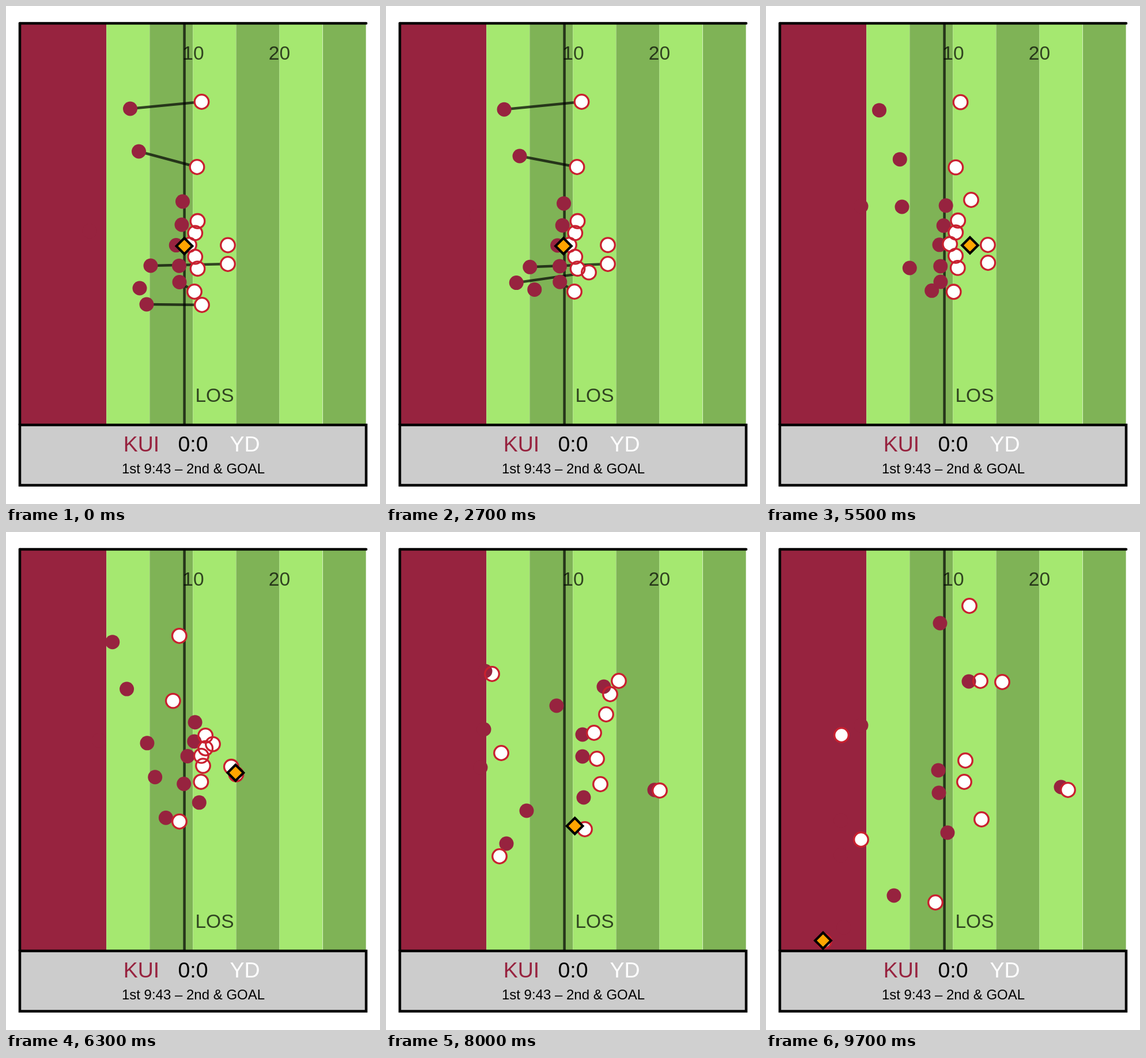
An HTML page with a canvas that plays this animation: 649x863 px, repeating every 9800 ms.

```html
<!DOCTYPE html>
<html lang="en">
<head>
<meta charset="utf-8">
<title>Play animation</title>
<style>
  html, body { margin: 0; width: 100%; height: 100%; overflow: hidden; background: #fff; }
  canvas { display: block; width: 649px; height: 863px; }
</style>
</head>
<body>
<canvas id="stage" width="649" height="863"></canvas>
<script>
const ctx = document.getElementById('stage').getContext('2d');
const LOOP = 9800, STEP = 100;
const SNAP = 5.1, SNAP_CAUGHT = 5.77, THROW = 7.6, CATCH = 8.53;
const MAROON = '#97233f', RED = '#c9202f', INK = 'rgba(0,0,0,0.7)';
const LIGHT = '#a5e870', DARK = '#7fb356';

const mix = (a, b, k) => a + (b - a) * k;
const mixPoint = (p, q, k) => [mix(p[0], q[0], k), mix(p[1], q[1], k)];
const add = (p, q) => [p[0] + q[0], p[1] + q[1]];

// Monotone cubic interpolation: eases in from rest, never overshoots.
function curve(ts, vs) {
  const slopes = ts.slice(1).map((t, i) => (vs[i + 1] - vs[i]) / (t - ts[i]));
  const tangents = ts.map((_, i) => {
    const a = slopes[i - 1] ?? slopes[i], b = slopes[i] ?? a;
    return a * b > 0 ? 2 * a * b / (a + b) : 0;
  });
  return t => {
    let i = 0;
    while (i < ts.length - 2 && t > ts[i + 1]) i++;
    const h = ts[i + 1] - ts[i];
    const u = Math.min(1, (t - ts[i]) / h), w = 1 - u;
    return vs[i] * (1 + 2 * u) * w * w + tangents[i] * h * u * w * w
      + vs[i + 1] * u * u * (3 - 2 * u) - tangents[i + 1] * h * u * u * w;
  };
}

// Smooth path through [time, x, y] points.
function track(...points) {
  const [ts, xs, ys] = [0, 1, 2].map(k => points.map(p => p[k]));
  const x = curve(ts, xs), y = curve(ts, ys);
  return t => [x(t), y(t)];
}

const timed = (times, points) => track(...points.map((p, i) => [times[i], ...p]));

// Waits on a spot until the snap, then runs through three points.
const run = (spot, ...points) => timed([0, 5.3, 7.1, 8, 9.7], [spot, spot, ...points]);

// A defender keeps a changing offset from his man.
const follow = (man, offset) => t => add(man(t), offset(t));
const mark = (man, ...offsets) => follow(man, timed([0, 5.5, 8, 9.7], offsets));

// Offensive line: evenly spaced, bowed back from the center.
const lineSpot = i => [318 + 14.5 * Math.sqrt(Math.abs(i) / 2), 414 + 20.6 * i];

const tackleA = run(lineSpot(-2), [365, 324], [389, 281], [372, 258]);
const guardA = run(lineSpot(-1), [367, 349], [382, 316], [410, 260]);
const center = run(lineSpot(0), [357, 361], [361, 348], [346, 396]);
const guardB = run(lineSpot(1), [357, 384], [366, 393], [344, 433]);
const tackleB = run(lineSpot(2), [348, 417], [372, 437], [374, 498]);

const wideA = run([339.5, 166], [248, 202], [184, 246], [131, 352]);
const wideB = run([331.5, 279], [240, 316], [200, 383], [165, 533]);
const tight = run([327, 495], [262, 514], [197, 562], [101, 709]);
const runner = run([385, 447], [398, 348], [404, 258], [353, 128]);
const passer = track([0, 385, 414.5], [5.5, 385, 414], [7.1, 428, 431],
  [8, 475, 448], [9, 525, 448], [9.7, 524, 447]);
const motion = track([0, 340, 518], [1.4, 341, 512], [3.9, 361, 396], [5.5, 356, 336],
  [7.1, 362, 428], [8, 345, 515], [9.7, 294, 642]);

const cornerA = mark(wideA, [-124, 12], [-141, 14], [-12, -5], [34, -17]);
const cornerB = mark(wideB, [-101, -27], [-97, -14], [-30, -41], [-35, -33]);
const backerA = mark(runner, [-134, 3], [-136, 9], [-108, 43], [-51, 30]);
const backerB = mark(tight, [-95, -6], [-38, -2], [12, -22], [34, -24]);
const endA = mark(tackleA, [-26, -34], [-21, -26], [-11, -13], [-20, 1]);
const endB = mark(passer, [-84, 64], [-82, 64], [-9, -1], [-12, -5]);
const rushA = mark(center, [-13, -35], [-11, -32], [-20, 3], [-47, 17]);
const rushB = mark(guardB, [-33, -20], [-28, -19], [-25, -4], [-44, 19]);
const rushC = mark(tackleB, [-32, -5], [-30, -3], [-29, 23], [-59, 23]);
const nickel = follow(motion, track([0, -96, -1], [1.4, -108, 11], [3.9, -136, 21],
  [5.5, -120, 12], [8, -101, -32], [9.7, -72, -12]));
const safety = track([0, 145, 390], [5.5, 165, 347], [7.1, 158, 385], [8, 164, 408], [9.7, 130, 560]);

const defense = [cornerA, cornerB, backerA, backerB, endA, endB, rushA, rushB, rushC, nickel, safety];
const behind = [wideA, wideB, tackleA, guardA, guardB, runner, tackleB, motion, tight];
const front = [center, passer];
const matchups = [[cornerA, wideA], [cornerB, wideB], [backerA, runner], [endB, tight], [nickel, motion]];

const held = t => add(passer(t), [-1, -2.5]);
const carried = t => add(tight(t), [-2, -1]);

function ballAt(t) {
  if (t < SNAP) return [mix(309.5, 308, Math.min(1, t / 2)), 416];
  if (t < SNAP_CAUGHT) return mixPoint([308, 416], passer(t), (t - SNAP) / (SNAP_CAUGHT - SNAP));
  if (t < THROW) return held(t);
  if (t < CATCH) return mixPoint(held(THROW), carried(CATCH), (t - THROW) / (CATCH - THROW));
  return carried(t);
}

function rect(color, x, y, w, h) {
  ctx.fillStyle = color;
  ctx.fillRect(x, y, w, h);
}

function line(color, [x1, y1], [x2, y2]) {
  ctx.strokeStyle = color;
  ctx.lineWidth = 4.5;
  ctx.beginPath();
  ctx.moveTo(x1, y1);
  ctx.lineTo(x2, y2);
  ctx.stroke();
}

function circle([x, y], r) {
  ctx.beginPath();
  ctx.arc(x, y, r, 0, Math.PI * 2);
}

function label(text, x, y, size, color) {
  ctx.font = `${size}px "Liberation Sans", Arial, sans-serif`;
  ctx.textAlign = 'center';
  ctx.fillStyle = color;
  ctx.fillText(text, x, y);
}

function drawField() {
  rect('#fff', 0, 0, 649, 863);
  rect(MAROON, 24, 30, 150.3, 696);
  for (let i = 0; i < 6; i++) {
    rect(i % 2 ? DARK : LIGHT, 174.3 + i * 75.05, 30, 75.05, 696);
  }
  rect('#d5f0c0', 549, 30, 1, 696);
  label('10', 325, 93, 33.5, INK);
  label('20', 474.5, 93, 33.5, INK);
  label('LOS', 362, 686, 33.5, INK);
  line(INK, [309.6, 30], [309.6, 726]);
}

function drawBoard() {
  ctx.lineCap = 'round';
  line('#000', [24, 30], [625, 30]);
  line('#000', [24, 30], [24, 726]);
  ctx.lineCap = 'butt';
  rect('#ccc', 24, 726, 601, 104.5);
  ctx.strokeRect(24, 726, 601, 104.5);
  label('KUI', 235, 772.3, 37.5, MAROON);
  label('0:0', 324.5, 772.3, 37.5, '#000');
  label('YD', 414.5, 772.3, 37.5, '#fff');
  label('1st 9:43 – 2nd & GOAL', 325, 810, 24, '#000');
}

function drawPlayers(t) {
  const fill = (players, color, r) => {
    ctx.fillStyle = color;
    players.forEach(at => { circle(at(t), r); ctx.fill(); });
  };
  if (t < SNAP) matchups.forEach(([a, b]) => line(INK, a(t), b(t)));
  fill(behind, '#fff', 12.3);
  fill(defense, MAROON, 12.5);
  fill(front, '#fff', 12.3);
  ctx.strokeStyle = RED;
  ctx.lineWidth = 3.3;
  [...behind, ...front].forEach(at => { circle(at(t), 12.3); ctx.stroke(); });
}

function drawBall([x, y]) {
  const r = 13.8;
  ctx.beginPath();
  ctx.moveTo(x, y - r);
  ctx.lineTo(x + r, y);
  ctx.lineTo(x, y + r);
  ctx.lineTo(x - r, y);
  ctx.closePath();
  ctx.fillStyle = '#ffa500';
  ctx.fill();
  ctx.strokeStyle = '#000';
  ctx.lineWidth = 4.2;
  ctx.stroke();
}

const start = performance.now();

function frame() {
  const elapsed = (performance.now() - start) % LOOP;
  const t = Math.floor(elapsed / STEP) * STEP / 1000;
  drawField();
  drawBoard();
  drawPlayers(t);
  drawBall(ballAt(t));
  requestAnimationFrame(frame);
}
frame();
</script>
</body>
</html>
```
